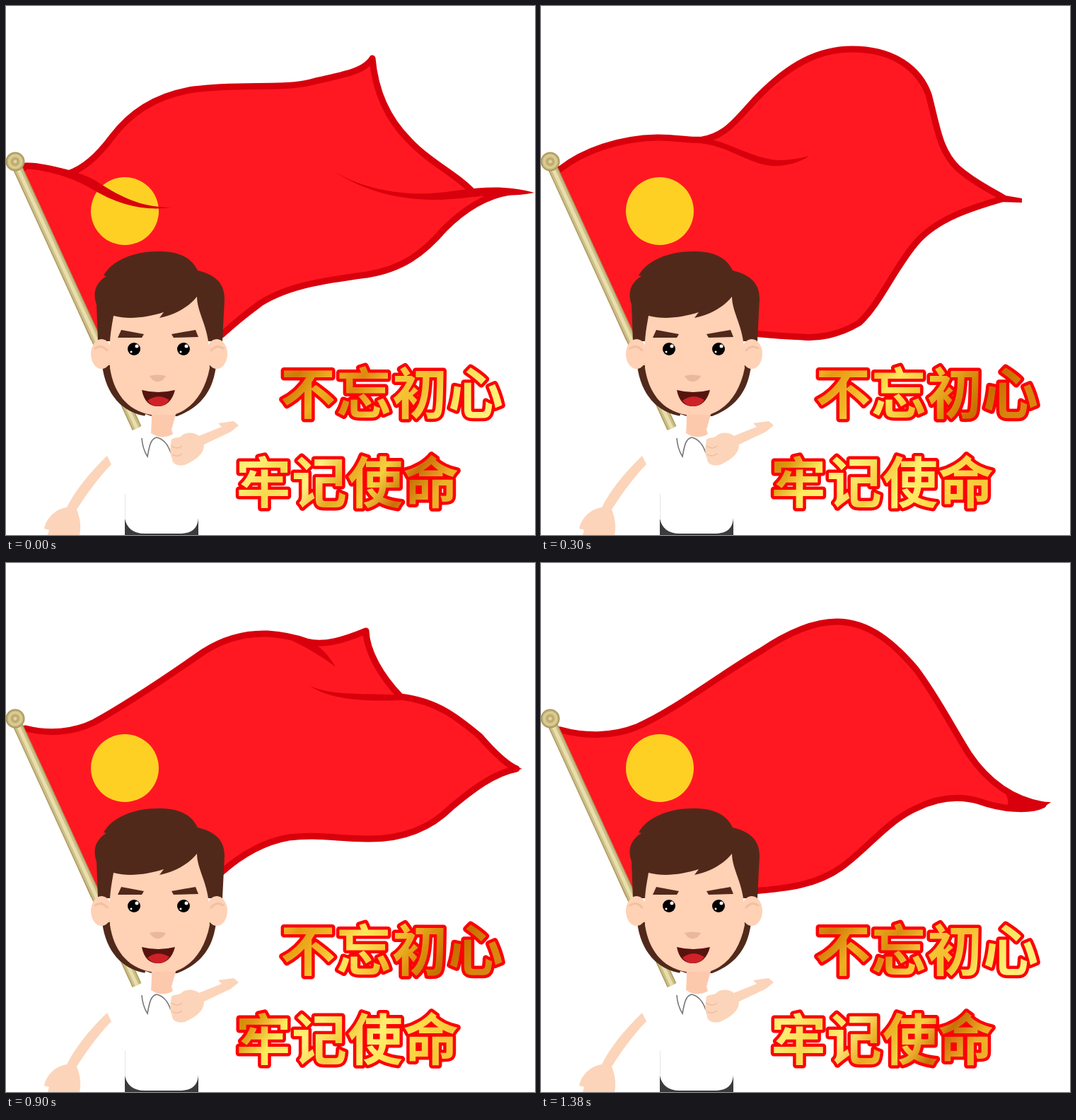
An HTML page that plays this animation: 748x748 px, repeating every 1.5 s.

```html
<!DOCTYPE html>
<html lang="zh">
<head>
<meta charset="utf-8">
<style>
  html, body { margin: 0; width: 100%; height: 100%; overflow: hidden; background: #fff; }
  svg { display: block; width: 100vw; height: 100vh; }
  text {
    font: 900 78px "Noto Sans CJK SC", "Noto Sans CJK", sans-serif;
    letter-spacing: 1px;
    stroke: #fd0006; stroke-width: 9; stroke-linejoin: round; paint-order: stroke;
  }
</style>
</head>
<body>
<svg viewBox="0 0 748 748">
  <defs id="defs">
    <radialGradient id="knob">
      <stop offset="0" stop-color="#f0e8bd"/>
      <stop offset=".3" stop-color="#b9a566"/>
      <stop offset=".65" stop-color="#e0d39b"/>
      <stop offset="1" stop-color="#a08c50"/>
    </radialGradient>
  </defs>

  <path id="cloth" fill="#ff1821" stroke="#d8000c" stroke-width="9" stroke-linejoin="round"/>
  <circle cx="168" cy="290" r="48" fill="#ffd024"/>
  <path id="folds" fill="#d8000c"/>

  <g fill="none">
    <path d="M16 228L185 597" stroke="#ad9b62" stroke-width="14"/>
    <path d="M16 228L185 597" stroke="#cdbe85" stroke-width="11"/>
    <path d="M16 228L185 597" stroke="#e8deae" stroke-width="5"/>
  </g>
  <circle cx="13" cy="220" r="13.5" fill="url(#knob)"/>

  <!-- hair, head and neck -->
  <g fill="#51291b">
    <path d="M130 474L128 422C122 405 127 391 142 382L138 381C150 360 180 347 215 347C245 346 263 357 271 374C296 380 309 392 309 414L306 474Z"/>
    <path d="M136 508C141 550 165 575 198 580L242 580C275 567 293 545 297 508Z"/>
  </g>
  <path fill="#fdc9ad" d="M206 570L205 604C214 611 228 611 236 605L234 599L241 574Z"/>
  <g fill="#ffd1b5">
    <ellipse cx="135" cy="492" rx="15" ry="21"/>
    <ellipse cx="298" cy="492" rx="15" ry="21"/>
    <path d="M152 438C175 444 200 440 223 433L217 441C240 437 260 424 270 411C270 430 283 450 286 474L288 512C281 548 262 570 238 578L205 578C170 572 152 545 147 512L147 474C148 460 150 450 152 438Z"/>
  </g>
  <path fill="none" stroke="#f0c1a4" stroke-width="3" stroke-linecap="round" d="M126 484Q135 478 143 487M307 484Q298 478 290 487"/>
  <path fill="#51291b" d="M163 458L195 464L192 469L158 469ZM268 458L234 464L237 469L272 468Z"/>
  <path fill="#eab89c" d="M203 523Q214 520 226 523C220 534 209 534 203 523Z"/>
  <path fill="#57140f" d="M192 543Q215 549 239 543C235 559 226 566 215 566C203 566 195 559 192 543Z"/>
  <path fill="#cf2228" d="M200 558Q215 547 231 557C227 563 222 566 215 566C208 566 204 563 200 558Z"/>
  <g id="eye">
    <circle cx="181" cy="485" r="9"/>
    <circle cx="185" cy="481" r="2.5" fill="#fff"/>
    <circle cx="177" cy="489" r="1.5" fill="#fff"/>
  </g>
  <use href="#eye" x="70"/>

  <!-- collar and trousers -->
  <path fill="#fff" d="M197 577L206 580L205 604L213 609L200 638L190 604Z"/>
  <path fill="none" stroke="#777" stroke-width="1.6" d="M192 611Q193 626 200 637C203 620 205 612 213 610C222 612 229 620 233 632"/>
  <path fill="#3b3b3d" d="M168 724C170 738 180 746 196 746L248 746C264 745 271 738 272 724L272 748L168 748Z"/>
  <path stroke="#e4e4e4" d="M168.500 690V726"/>

  <!-- arms -->
  <g fill="#fcd4ba">
    <path d="M270 609L305 595L300 590L322 587L329 593L318 602L276 622Z"/>
    <path d="M250 606C262 600 275 606 279 616C283 630 272 640 255 648C245 652 234 648 235 640C230 632 233 620 234 613C239 609 246 612 250 606Z"/>
    <path d="M143 636C118 660 98 685 86 709C70 711 57 724 54 739L61 741L59 748L104 748C107 735 104 722 100 712C114 690 130 668 149 648Z"/>
  </g>
  <path fill="none" stroke="#edbd9f" stroke-width="1.500" d="M234 622Q242 628 249 622M235 634Q242 639 249 633"/>

  <text id="upper" x="388" y="577">不忘初心</text>
  <text id="lower" x="325" y="703">牢记使命</text>
</svg>
<script>
const $ = id => document.getElementById(id);

// Flag poses: outline from the pole top round to the bottom, then creases and tips.
const poses = [
  ["M28 226C45 225 70 232 88 237C110 230 130 212 150 185C180 145 220 125 265 118C330 109 390 118 430 108C470 98 505 95 518 74C522 120 540 160 570 190C600 222 640 240 662 265L712 263C680 268 650 285 620 315C590 350 560 372 510 380C450 388 400 395 360 420Q330 442 305 465",
   "M459 231C490 251 540 268 600 265C645 262 690 248 747 264C720 270 690 266 660 270C600 278 530 278 459 231ZM28 222C60 224 100 232 125 246C165 272 190 284 234 285C195 290 160 282 120 258C95 243 60 232 28 230Z"],
  ["M28 230C60 205 110 187 165 186C195 186 210 191 228 189C265 183 280 155 310 125C350 85 390 61 440 61C500 61 535 90 548 125C560 170 563 205 590 230C615 252 640 262 655 272C610 285 560 300 530 335C500 370 480 420 450 448C420 466 390 470 370 468Q340 467 300 463",
   "M225 186C265 190 295 215 335 218Q358 218 379 212C365 222 345 227 325 226C290 222 265 198 225 194ZM645 266L680 272L680 278L648 277Z"],
  ["M28 232C70 222 100 195 140 168C180 143 215 132 260 132C310 133 345 150 382 162C420 160 450 145 475 120C490 102 500 86 520 87C508 105 512 145 530 180C550 215 570 245 605 262C640 275 685 295 706 323C690 320 640 320 590 340C540 355 510 380 470 405C420 430 390 432 350 434L305 439",
   "M360 152C380 158 398 170 412 185C395 180 375 172 355 160ZM512 83L537 87L516 94ZM695 312L712 328L690 326Z"],
  ["M28 234C60 242 95 240 125 225C170 200 230 160 280 125C310 106 340 99 370 100Q400 102 425 111C450 118 480 108 509 96C510 125 530 160 558 189C610 195 640 220 670 245C690 268 708 285 722 291C690 297 660 320 630 345C600 375 560 390 515 390C470 390 440 383 400 388C360 395 330 415 305 437",
   "M415 104C440 112 455 128 466 147C452 136 430 122 405 110ZM430 174C460 188 510 184 560 187L560 194C510 196 460 194 430 174ZM712 285L730 291L712 296Z"],
  ["M28 236C60 245 100 246 135 232C190 208 250 160 310 125C350 98 385 83 418 83C465 83 500 115 530 150C560 190 580 230 605 270C630 307 665 334 710 342C690 352 650 348 620 337C590 328 560 332 530 347C490 365 460 405 425 430C390 455 350 460 300 464",
   "M655 322Q690 338 721 338Q700 356 650 349Q668 345 655 322Z"]
];

// Gold sheen as evenly spaced colours; each line alternates between two.
const sheens = {
  upper0: "#e59a1a #d07a08 #f0b020 #dc8a10 #f7c83a #f4bd30 #fbe058 #fff078",
  upper1: "#ffd348 #e79a12 #f3b526 #ffe75c #f5c434 #dc9310 #c66e00 #d88610",
  lower0: "#ffe860 #fff07a #f8d84c #fff080 #e8a820 #f6d040 #c87008 #eeb028",
  lower1: "#c67804 #dc960e #ffe95c #fff078 #f6cc40 #fff070 #ffdc4a #f8c83a"
};
for (const [id, list] of Object.entries(sheens)) {
  const stops = list.split(" ").map((c, i) => `<stop offset="${i / 7}" stop-color="${c}"/>`);
  $("defs").innerHTML += `<linearGradient id="${id}" y2=".25">${stops.join("")}</linearGradient>`;
}

function draw() {
  const step = Math.floor(performance.now() % 1500 / 300);
  const [edge, folds] = poses[step];
  $("cloth").setAttribute("d", edge + "L124 470L19 235Z"); // closes behind the pole
  $("folds").setAttribute("d", folds);
  for (const id of ["upper", "lower"]) $(id).setAttribute("fill", `url(#${id}${step % 2})`);
  requestAnimationFrame(draw);
}
draw();
</script>
</body>
</html>
```
